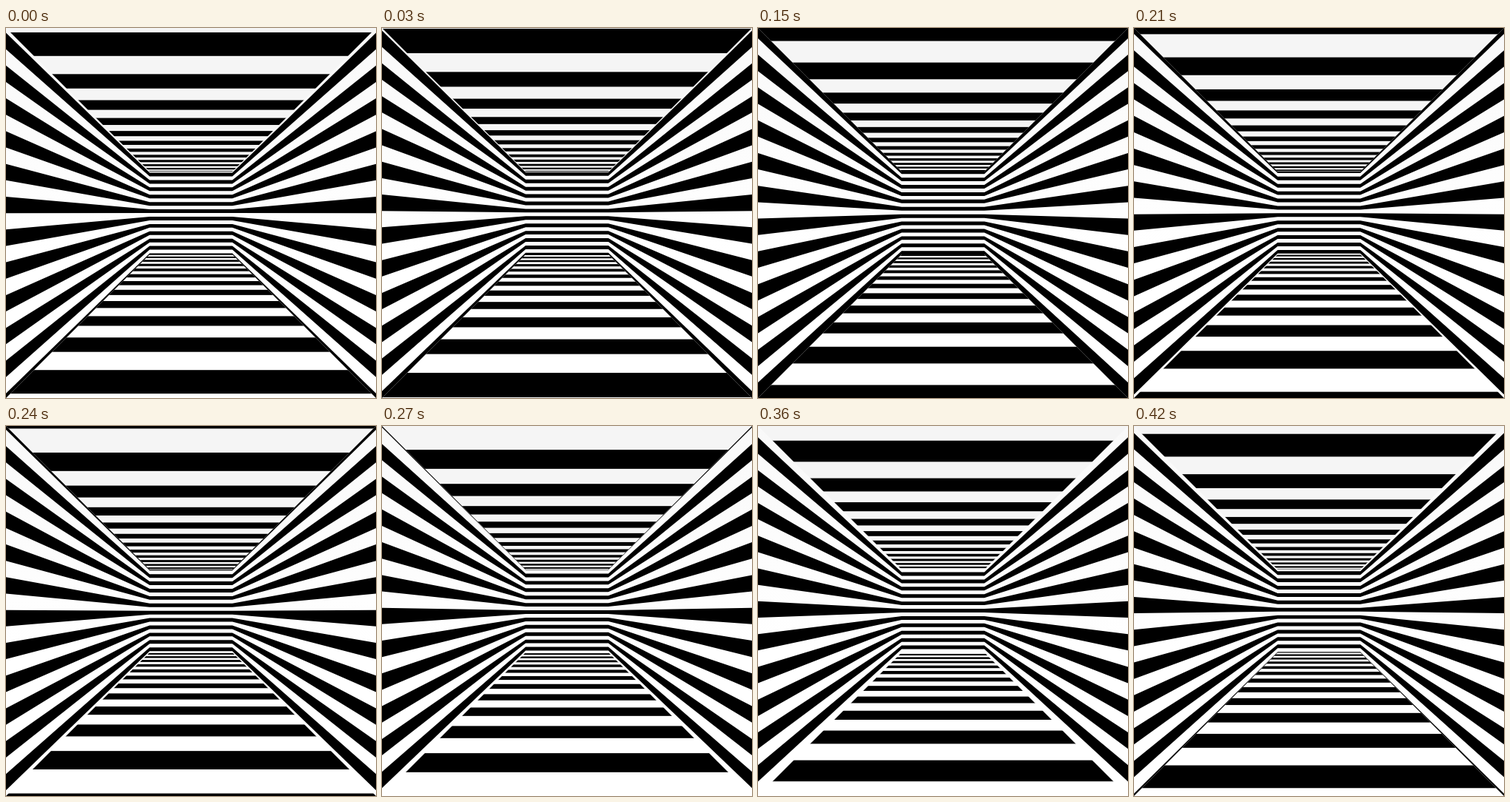
An HTML page with a canvas that plays this animation: 500x500 px, repeating every 0.45 s.

```html
<!DOCTYPE html>
<html>
<head>
<meta charset="utf-8">
<title>Striped room</title>
<style>
  html, body { margin: 0; height: 100%; overflow: hidden; background: #fff; }
  canvas { display: block; width: 500px; height: 500px; }
</style>
</head>
<body>
<canvas id="stage" width="500" height="500"></canvas>
<script>
const ctx = document.getElementById('stage').getContext('2d');
const LOOP = 450, STEP = 30;
const SIZE = 500, MID = 250;
const PERIOD = 44.3, BAR = PERIOD / 2;
const EYE = 144;                               // eye distance to the open front
const BACK = MID * EYE / (EYE + SIZE);         // half size of the back wall
const NEAR = MID - BACK, FAR = MID + BACK;

const wallPaint = ctx.createLinearGradient(0, 0, 0, SIZE);
wallPaint.addColorStop(0, '#f9f9f9');
wallPaint.addColorStop(0.6, '#fff');

function polygon(points) {
  ctx.beginPath();
  for (const [x, y] of points) ctx.lineTo(x, y);
  ctx.closePath();
}

// Side walls and back wall share bars that bend at the back corners.
function drawWalls(shift) {
  ctx.fillStyle = wallPaint;
  ctx.fillRect(0, 0, SIZE, SIZE);
  ctx.fillStyle = '#000';
  const atBack = v => MID + (v - MID) * BACK / MID;
  for (let v = 6.5 - shift - PERIOD; v < SIZE; v += PERIOD) {
    const w = v + BAR;
    polygon([
      [0, v], [NEAR, atBack(v)], [FAR, atBack(v)], [SIZE, v],
      [SIZE, w], [FAR, atBack(w)], [NEAR, atBack(w)], [0, w]
    ]);
    ctx.fill();
  }
}

// Ceiling bars slide toward the viewer; the floor is its mirror image.
function drawCeiling(shift, paint) {
  ctx.save();
  polygon([[0, 0], [SIZE, 0], [FAR, NEAR], [NEAR, NEAR]]);
  ctx.clip();
  ctx.fillStyle = paint;
  ctx.fillRect(0, 0, SIZE, MID);
  ctx.fillStyle = '#000';
  const project = depth => MID - MID * EYE / (EYE + depth);
  for (let z = 3.5 - shift - PERIOD; z < SIZE; z += PERIOD) {
    const top = project(z);
    ctx.fillRect(0, top, SIZE, project(z + BAR) - top);
  }
  ctx.restore();
}

function draw(now) {
  const time = Math.floor(now % LOOP / STEP) * STEP;
  const shift = PERIOD * time / LOOP;
  drawWalls(shift);
  drawCeiling(shift, '#f5f5f5');
  ctx.save();
  ctx.translate(0, SIZE);
  ctx.scale(1, -1);
  drawCeiling(shift, '#fff');
  ctx.restore();
}

const start = performance.now();
function tick() {
  draw(performance.now() - start);
  requestAnimationFrame(tick);
}
tick();
</script>
</body>
</html>
```
